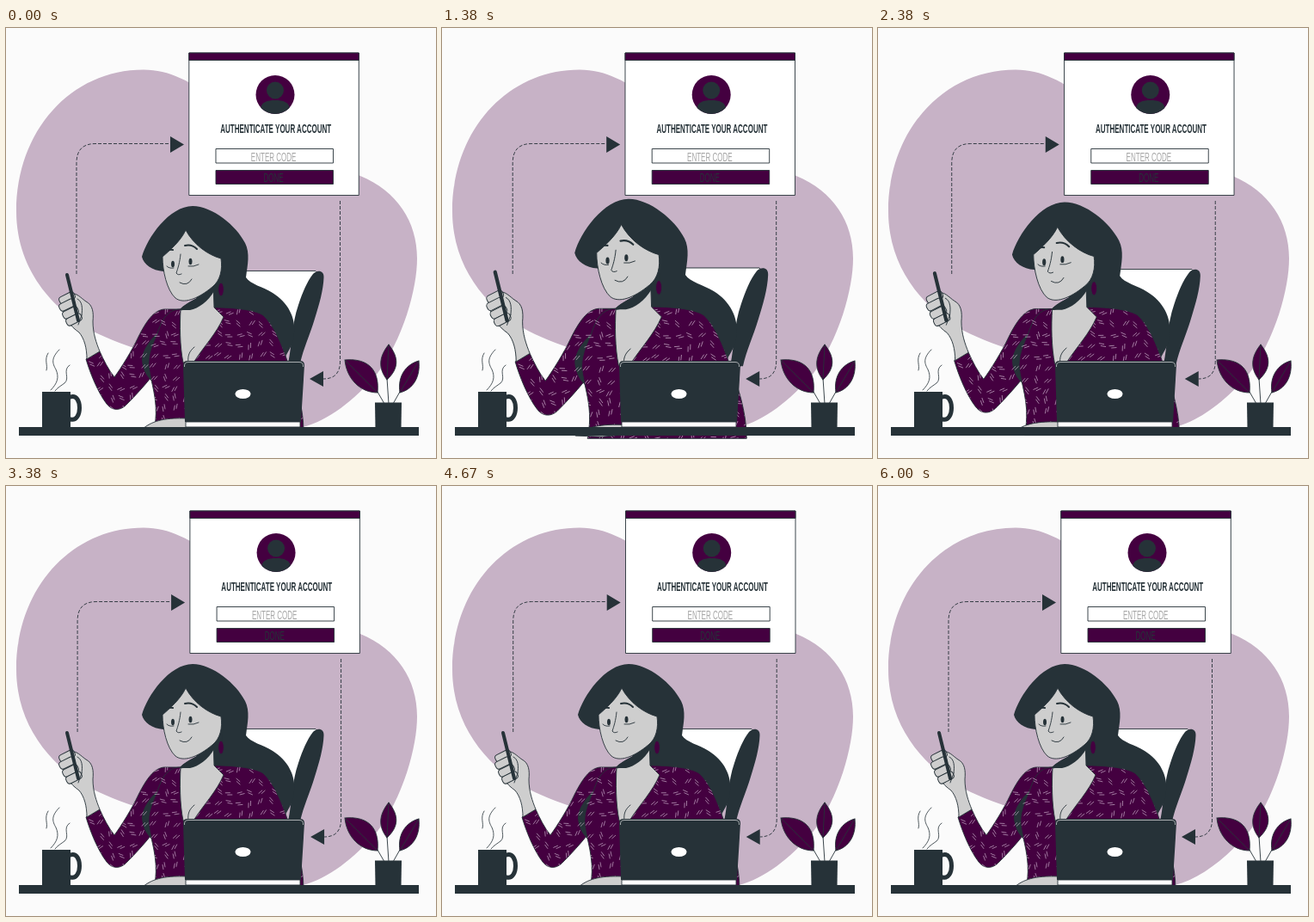
Write an HTML page that moves like this. It is 500 by 500 pixels and loops after 6.04 s.

```html
<!DOCTYPE html>
<html lang="en">
<head>
<meta charset="utf-8">
<title>Authenticate your account</title>
<style>
html, body { margin: 0; width: 100%; height: 100%; overflow: hidden; background: #fbfbfb; }
svg { display: block; width: 100vw; height: 100vh; }
.dark { fill: #263238; }
.plum { fill: #440040; }
.skin { fill: #cecece; }
.white { fill: #fff; }
.edge { stroke: #263238; stroke-width: .9; stroke-linejoin: round; }
.line { fill: none; stroke: #263238; stroke-width: .9; stroke-linecap: round; }
.dash { fill: none; stroke: #263238; stroke-width: .9; stroke-dasharray: 4 2; }
text { font: 14px "Liberation Sans", Arial, sans-serif; text-anchor: middle; }
.bold { font-weight: 700; }
</style>
</head>
<body>
<svg viewBox="0 0 500 500">
  <defs>
    <path id="sleeve" d="M204 327H184C172 328 163 341 154 359C146 376 134 395 126 406C119 397 114 387 109 376L93 385C98 402 107 424 117 437C123 445 133 446 141 437C154 424 168 408 180 392Z"/>
    <path id="torso" d="M204 327C190 327 183 334 176 355C167 375 164 385 167 400C171 420 178 440 172 469H346C346 440 336 410 327 387C321 368 311 345 299 334C288 327 262 325 242 325Z"/>
    <clipPath id="cloth"><use href="#sleeve"/><use href="#torso"/></clipPath>
    <clipPath id="badge"><circle cx="313" cy="77.5" r="22.5"/></clipPath>
  </defs>

  <path fill="#c7b2c6" d="M160 48.500C190 48.500 215 62 245 85C300 130 360 152 412 172C455 190 478 225 478 268C478 303 462 362 430 404C405 432 375 457 345 464C290 466 270 430 240 410C200 384 150 376 108 356C60 333 12 285 12 213C12 120 75 48.500 160 48.500Z"/>

  <g id="panel">
    <path class="white edge" d="M212.800 29H410.300V194.500H212.800Z"/>
    <path class="plum edge" d="M212.800 29H410.300V37.500H212.800Z"/>
    <circle class="plum" cx="313" cy="77.5" r="22.5"/>
    <g class="dark" clip-path="url(#badge)">
      <circle cx="313" cy="72.5" r="10"/>
      <path d="M296 101V95C296 86 304 84 313 84C322 84 330 86 330 95V101Z"/>
    </g>
    <path class="white edge" d="M244 140.500H380.500V157H244Z"/>
    <path class="plum edge" d="M244 165.500H380.500V181.500H244Z"/>
    <g transform="scale(.573 1)">
      <text class="dark bold" x="547.5" y="122.4">AUTHENTICATE YOUR ACCOUNT</text>
      <text x="543" y="155" fill="#a6a6a6">ENTER CODE</text>
      <text class="dark" x="543" y="179.4">DONE</text>
    </g>
    <path class="dash" d="M82 286V157C82 142 89 134.500 104 134.500H191"/>
    <path class="dash" d="M388.500 201V388C388.500 401 382 408 369 408"/>
    <path class="dark" d="M191 126V145L207 135.500ZM369 399V417L353 408Z"/>
  </g>

  <g id="woman">
    <path class="white edge" d="M272 282.500H360C364 285 360 296 354 306L332 368L290 330Z"/>
    <path class="dark" d="M357 286C361 281 370 281 369.500 290C369 305 364 322 359 338C353 358 346 372 342 390H328C333 366 332 345 340 322C345 307 350 295 357 286Z"/>
    <path class="dark" d="M158 266C164 244 190 207 217 207C240 207 268 230 278 250C284 262 281 275 279 290C284 298 299 301 310 308C328 319 337 337 335 355C335 367 329 374 325 382L290 345L201 328C207 322 215 318 222 314L190 290L183 283C170 282 160 275 158 266Z"/>
    <use href="#sleeve" class="plum edge"/>
    <path class="dark" d="M178 353C168 361 158 375 158 386C159 397 163 405 170 411L180 380Z"/>
    <use href="#torso" class="plum edge"/>
    <path id="weave" fill="none" stroke="#d3bcd2" stroke-width=".65" clip-path="url(#cloth)"/>
    <path class="skin edge" d="M241 295L242 325L253 336C245 355 231 369 218 389H206C202 370 202 345 203 328C213 327 222 321 229 311Z"/>
    <path class="dark" d="M202 328C206 322 215 318 222 314L242 297V306C235 318 224 326 214 328Z"/>
    <path class="line" d="M219 371C213 376 211 381 212 389"/>
    <path class="skin edge" d="M209 235C203 248 190 259 182 266C182 282 187 305 197 314C206 321 222 316 240 301C249 294 252 281 250 268C235 264 218 252 209 235Z"/>
    <ellipse class="dark" cx="194" cy="274.500" rx="2" ry="3.800"/>
    <ellipse class="dark" cx="214.500" cy="271.500" rx="2" ry="3.800"/>
    <path class="line" style="stroke-width:2" d="M183 263Q187 257 194 258M208 253Q216 251 222 257"/>
    <path class="line" d="M203 263C202 273 200 279 198 285Q200 288 204 286M202 296Q211 301 216 292M187 277Q190 280 195 279M212 277Q218 278 224 275"/>
    <path class="line" d="M251 289V297"/>
    <ellipse class="plum edge" cx="250" cy="304" rx="3.300" ry="7.800"/>
    <path class="skin edge" d="M74 309C82 307 87 314 93 318C101 322 102 331 101 341C101 355 105 366 109 376L94 385C94 372 91 361 85 354C75 347 67 337 65 325Z"/>
    <g id="fingers" class="skin edge"></g>
    <path class="line" style="stroke-width:4" d="M71 287L84 340"/>
    <path class="line" d="M83 315C89 318 89 326 88 334M88 334L84 345"/>
    <path class="skin edge" d="M159 466C169 458 181 453 210 454V465L188 467Z"/>
  </g>

  <path class="dark" d="M15 464H480V474H15Z"/>
  <path class="dark" d="M211 387H342Q347 387 347 392L343 458H208L206 392Q206 387 211 387Z"/>
  <path fill="none" stroke="#b8bcbe" stroke-width=".9" d="M207.500 394Q207 388.500 212 388.500H341Q346 388.500 345.500 394"/>
  <ellipse class="white" cx="275.500" cy="425.500" rx="9" ry="5.500"/>
  <path class="white edge" d="M209 458H342V464H209Z"/>

  <path class="dark" d="M42 423H75V465H42Z"/>
  <path class="line" style="stroke-width:5" d="M75 429C89 424 89 459 75 455"/>
  <path class="line" style="stroke-width:.8" d="M62 374C52 384 54 390 58 397C62 406 60 413 52 421M49 378C44 386 49 392 47 398M74 392C65 398 75 407 68 413C64 416 60 418 57 422"/>

  <path class="line" d="M432 423L440 437M443 407L445 437M458 423L450 437"/>
  <g class="plum edge">
    <path d="M394 386C415 384 435 392 432 424C412 424 396 408 394 386Z"/>
    <path d="M445 368C457 383 457 396 443 409C433 396 433 383 445 368Z"/>
    <path d="M480 387C465 391 455 405 458 424C474 420 482 405 480 387Z"/>
  </g>
  <path class="line" d="M394 386L432 424M445 368L443 409M480 387L458 424"/>
  <path class="dark" d="M429 435.500H460L459.500 465H429.500Z"/>
</svg>
<script>
const $ = id => document.getElementById(id);

// Pairs of short stitches on a loose grid
let seed = 7;
const random = () => (seed = seed * 16807 % 2147483647) / 2147483647;
let stitches = '';
for (let y = 328; y < 470; y += 12.5) {
  for (let x = 95; x < 348; x += 12.5) {
    const cx = x + random() * 5, cy = y + random() * 5, a = random() * Math.PI;
    const c = Math.cos(a), s = Math.sin(a);
    for (const side of [-1.2, 1.2]) {
      const px = cx - s * side - c * (3 - side), py = cy + c * side - s * (3 - side);
      stitches += `M${px.toFixed(1)} ${py.toFixed(1)}l${(c * 6).toFixed(1)} ${(s * 6).toFixed(1)}`;
    }
  }
}
$('weave').setAttribute('d', stitches);

$('fingers').innerHTML = [[71, 314], [71, 322], [75, 331], [79, 339]].map(([x, y]) =>
  `<rect x="${x - 9.5}" y="${y - 4.5}" width="19" height="9" rx="3.5" transform="rotate(-27 ${x} ${y})"/>`).join('');

// Piecewise linear value at p in [0, 1]; keys are [position, value]
function track(keys, p) {
  const i = Math.max(1, keys.findIndex(k => k[0] >= p));
  const [a, u] = keys[i - 1], [b, v] = keys[i];
  return u + (v - u) * (p - a) / (b - a);
}
const shake = [0, -1, 2, -4, 4, -4, 4, -4, 2, -1, 0].map((v, i) => [i / 10, v]);
const beat = [[0, 1], [1, 1], [1.6, 1.1], [2.8, 1], [3.4, 1], [4, 1.1], [4.6, 1], [6, 1]]
  .map(([s, v]) => [s / 6, v]);

function draw(now) {
  const p = Math.min(1, now % 6040 / 6000);
  $('panel').setAttribute('transform', `translate(${track(shake, p)})`);
  $('woman').setAttribute('transform',
    `translate(217 338) scale(${track(beat, p)}) translate(-217 -338)`);
}
const start = performance.now();
function tick() {
  draw(performance.now() - start);
  requestAnimationFrame(tick);
}
tick();
</script>
</body>
</html>
```
